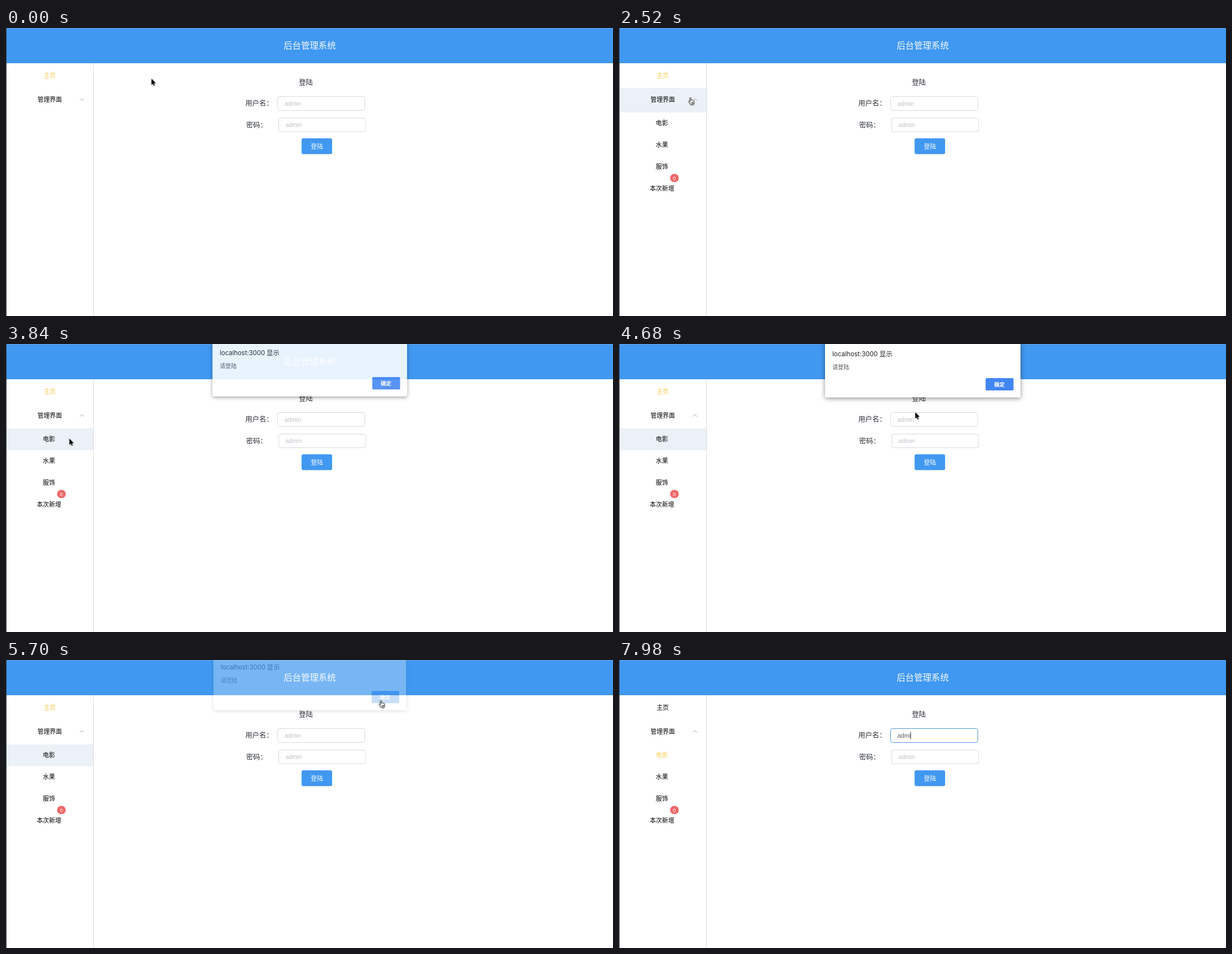
These frames come from a looping animation (1087x515 px, 8 s). An HTML page:

```html
<!DOCTYPE html>
<html lang="zh-CN">
<head>
<meta charset="utf-8">
<title>后台管理系统</title>
<style>
  html, body { margin: 0; width: 100%; height: 100%; overflow: hidden; background: #fff; }
  svg { display: block; width: 1087px; height: 515px; }
  text { font-family: "Noto Sans CJK SC", "Noto Sans CJK", sans-serif; font-size: 12.5px; fill: #2c3038; }
  .mid { text-anchor: middle; }
  .menu { font-size: 10.9px; font-weight: 500; fill: #000; text-anchor: middle; }
  .latin { font-family: "Liberation Sans", Arial, sans-serif; font-size: 10.8px; fill: #555a63; }
  .hint { fill: #bfc2c8; }
  .field { fill: #fff; stroke: #d6d9df; }
  .hover { fill: #ebf1f6; opacity: 0; }

  /* One shared clock: 1% = 80 ms */
  .run { animation: 8s linear infinite; }
  .step { animation: 8s step-end infinite; }

  #home { animation-name: home; }
  #film { animation-name: film; }
  #groupHover { animation-name: groupHover; }
  #filmHover { animation-name: filmHover; }
  #reveal { animation-name: reveal; transform-origin: 0 151px; }
  #chevron { animation-name: chevron; transform-origin: 136px 128px; }
  #dialog { animation-name: dialog; transform-origin: 544px 0; }
  #ok { animation-name: ok; }
  #user { animation-name: user; }
  #userHint { animation-name: userHint; }
  #caret { animation-name: caret; }
  #pointer { animation-name: move; animation-timing-function: ease-in-out; }
  #arrow { animation-name: arrow; }
  #hand { animation-name: hand; }
  #beam { animation-name: beam; }
  .k1 { animation-name: k1; }
  .k2 { animation-name: k2; }
  .k3 { animation-name: k3; }
  .k4 { animation-name: k4; }

  @keyframes home { 0%, 71.2% { fill: #f7cb50; } 75%, 100% { fill: #000; } }
  @keyframes film { 0%, 71.2% { fill: #000; } 75%, 100% { fill: #f7cb50; } }
  @keyframes groupHover {
    0%, 15% { opacity: 0; } 18.75%, 39.25% { opacity: 1; } 43%, 100% { opacity: 0; }
  }
  @keyframes filmHover {
    0%, 39.25% { opacity: 0; } 43%, 84% { opacity: 1; } 87.75%, 100% { opacity: 0; }
  }
  @keyframes reveal {
    0%, 22.5% { transform: scaleY(0); animation-timing-function: ease-in-out; }
    26.25%, 100% { transform: scaleY(1); }
  }
  @keyframes chevron {
    0%, 22.5% { transform: rotate(0deg); } 26.25%, 100% { transform: rotate(180deg); }
  }
  @keyframes dialog {
    0%, 46.2% { opacity: 0; transform: translateY(-6px) scale(.98); }
    48% { opacity: .88; transform: translateY(-1.4px) scale(.995); }
    48.75%, 69.5% { opacity: 1; transform: none; }
    69.75% { opacity: .88; transform: translateY(-1.4px) scale(.995); }
    72%, 100% { opacity: 0; transform: translateY(-6px) scale(.98); }
  }
  @keyframes ok { 0%, 64.5% { fill: #4285f4; } 66%, 100% { fill: #4089e2; } }
  @keyframes user {
    0%, 79% { stroke: #d6d9df; } 80.5%, 83.3% { stroke: #b0b2b8; } 85.5%, 100% { stroke: #4a98e2; }
  }
  @keyframes userHint { 0% { visibility: visible; } 90.75%, 100% { visibility: hidden; } }
  @keyframes caret {
    0% { visibility: hidden; transform: none; }
    82.5% { visibility: visible; transform: none; }
    88.75% { visibility: hidden; transform: none; }
    90.75% { visibility: visible; transform: translateX(6px); }
    93.75% { visibility: visible; transform: translateX(12px); }
    96.75% { visibility: visible; transform: translateX(20.6px); }
    98.25%, 100% { visibility: visible; transform: translateX(22.8px); }
  }
  @keyframes k1 { 0% { visibility: hidden; } 90.75%, 100% { visibility: visible; } }
  @keyframes k2 { 0% { visibility: hidden; } 93.75%, 100% { visibility: visible; } }
  @keyframes k3 { 0% { visibility: hidden; } 96.75%, 100% { visibility: visible; } }
  @keyframes k4 { 0% { visibility: hidden; } 98.25%, 100% { visibility: visible; } }

  @keyframes move {
    0%, 3.75% { transform: translate(260.5px, 90.5px); }
    20%, 35.25% { transform: translate(128px, 124.5px); }
    42.75%, 49.5% { transform: translate(113.5px, 169px); }
    56.25% { transform: translate(515px, 123px); animation-timing-function: linear; }
    58.5% { transform: translate(530.5px, 122px); }
    66.5%, 72% { transform: translate(671.5px, 72.5px); }
    80.25%, 100% { transform: translate(540px, 140px); }
  }
  @keyframes arrow {
    0% { visibility: visible; } 15% { visibility: hidden; }
    46.2% { visibility: visible; } 64.5% { visibility: hidden; }
    72% { visibility: visible; } 79%, 100% { visibility: hidden; }
  }
  @keyframes hand {
    0% { visibility: hidden; } 15% { visibility: visible; }
    46.2% { visibility: hidden; } 64.5% { visibility: visible; }
    72%, 100% { visibility: hidden; }
  }
  @keyframes beam {
    0% { visibility: hidden; } 79% { visibility: visible; } 90.75%, 100% { visibility: hidden; }
  }
</style>
</head>
<body>
<svg viewBox="0 0 1087 515">
  <defs>
    <clipPath id="open"><rect id="reveal" class="run" y="151" width="156" height="156"/></clipPath>
    <filter id="shade" x="-10%" y="-20%" width="120%" height="150%">
      <feDropShadow dx="0" dy="2" stdDeviation="4" flood-color="#000" flood-opacity=".45"/>
    </filter>
    <filter id="soft" x="-50%" y="-50%" width="200%" height="200%">
      <feDropShadow dx="0" dy="1" stdDeviation=".8" flood-color="#000" flood-opacity=".3"/>
    </filter>
  </defs>

  <!-- Page frame -->
  <rect width="1087" height="515" fill="#fff"/>
  <rect width="1087" height="63" fill="#4198f1"/>
  <rect width="1087" height="1" fill="#6aa5df"/>
  <rect width="1" height="515" fill="#343c4c"/>
  <rect x="156" y="63" width="1" height="452" fill="#d9d9d9"/>
  <text class="mid" x="544" y="37" style="font-size:15.6px;font-weight:300;fill:#f4f9ff">后台管理系统</text>

  <!-- Side menu -->
  <rect id="groupHover" class="hover run" x="1" y="107" width="155" height="44"/>
  <text id="home" class="menu run" x="78.3" y="89.2">主页</text>
  <text class="menu" x="78.3" y="132.2">管理界面</text>
  <path id="chevron" class="run" d="M132.3 126.2 L136 129.8 L139.7 126.2" fill="none" stroke="#999ca2" stroke-width=".9"/>
  <g clip-path="url(#open)">
    <rect id="filmHover" class="hover run" x="1" y="151" width="155" height="39"/>
    <text id="film" class="menu run" x="77" y="174.2">电影</text>
    <text class="menu" x="77" y="213.2">水果</text>
    <text class="menu" x="77" y="252.2">服饰</text>
    <text class="menu" x="77" y="291.2">本次新增</text>
    <rect x="91.5" y="261" width="15.5" height="14.5" rx="7.25" fill="#ec6666"/>
    <text class="latin mid" x="99.2" y="271.7" style="font-size:9.4px;fill:#fff">0</text>
  </g>

  <!-- Login form -->
  <text class="mid" x="537" y="101.7">登陆</text>
  <text x="428.5" y="139">用户名：</text>
  <text x="430" y="177.7">密码：</text>
  <rect id="user" class="field run" x="486.5" y="122.5" width="156" height="25" rx="3"/>
  <rect class="field" x="488.5" y="161" width="155.5" height="24.5" rx="3"/>
  <text id="userHint" class="latin hint step" x="498.8" y="139">admin</text>
  <text class="latin" x="498.8" y="139"><tspan class="k1 step">a</tspan><tspan class="k2 step">d</tspan><tspan class="k3 step">m</tspan><tspan class="k4 step">i</tspan></text>
  <rect id="caret" class="step" x="499" y="129" width="1" height="12.5" fill="#333"/>
  <text class="latin hint" x="500.6" y="177.2">admin</text>
  <rect x="529.3" y="197.3" width="54.7" height="28.2" rx="3" fill="#4198f1"/>
  <text class="menu" x="556.7" y="215.6" style="fill:#fff">登陆</text>

  <!-- Alert -->
  <g id="dialog" class="run">
    <rect x="369" y="-12" width="350" height="107.3" rx="2" fill="#fff" filter="url(#shade)"/>
    <text x="382" y="21.8" style="font:11.5px Inter,'Noto Sans CJK SC',sans-serif;fill:#222">localhost:3000 显示</text>
    <text x="382" y="44.8" style="font-size:10.1px;fill:#555">请登陆</text>
    <rect id="ok" class="run" x="656.5" y="61" width="50" height="22" rx="1.8"/>
    <text class="mid" x="681.3" y="75.6" style="font-size:9.6px;font-weight:700;fill:#fff">确定</text>
  </g>

  <!-- Mouse pointer -->
  <g id="pointer" class="run">
    <path id="arrow" class="step" d="M0 0 V11.2 L2.5 8.9 L4.2 12.8 L6 12 L4.3 8.2 H7.8 Z"
      fill="#000" stroke="#fff" stroke-width=".9" paint-order="stroke" filter="url(#soft)"/>
    <path id="hand" class="step" transform="translate(-4.2 -.2)" filter="url(#soft)"
      d="M3 1.4 c0 -1.6 2.2 -1.6 2.2 0 V5 c.3 -.9 1.9 -.8 2 .2 c.4 -.7 1.8 -.5 1.9 .5 c.5 -.5 1.6 -.3 1.6 .8 V9 c0 1.2 -.9 2 -.9 3.6 H4.6 C4.3 11 2.2 9.5 .9 7.6 c-.5 -1 .6 -1.7 1.5 -.9 L3.6 7.7 Z M6.2 8.4 V11 M7.6 8.4 V11 M9 8.4 V11"
      fill="#fff" stroke="#111" stroke-width=".9" stroke-linejoin="round"/>
    <path id="beam" class="step" d="M-2.6 -5.8 Q0 -5.8 0 -4.2 Q0 -5.8 2.6 -5.8 M0 -4.6 V4.6 M-2.6 5.8 Q0 5.8 0 4.2 Q0 5.8 2.6 5.8 M-1.6 2 H1.6"
      fill="none" stroke="#111" stroke-width="1.1"/>
  </g>
</svg>
</body>
</html>
```
